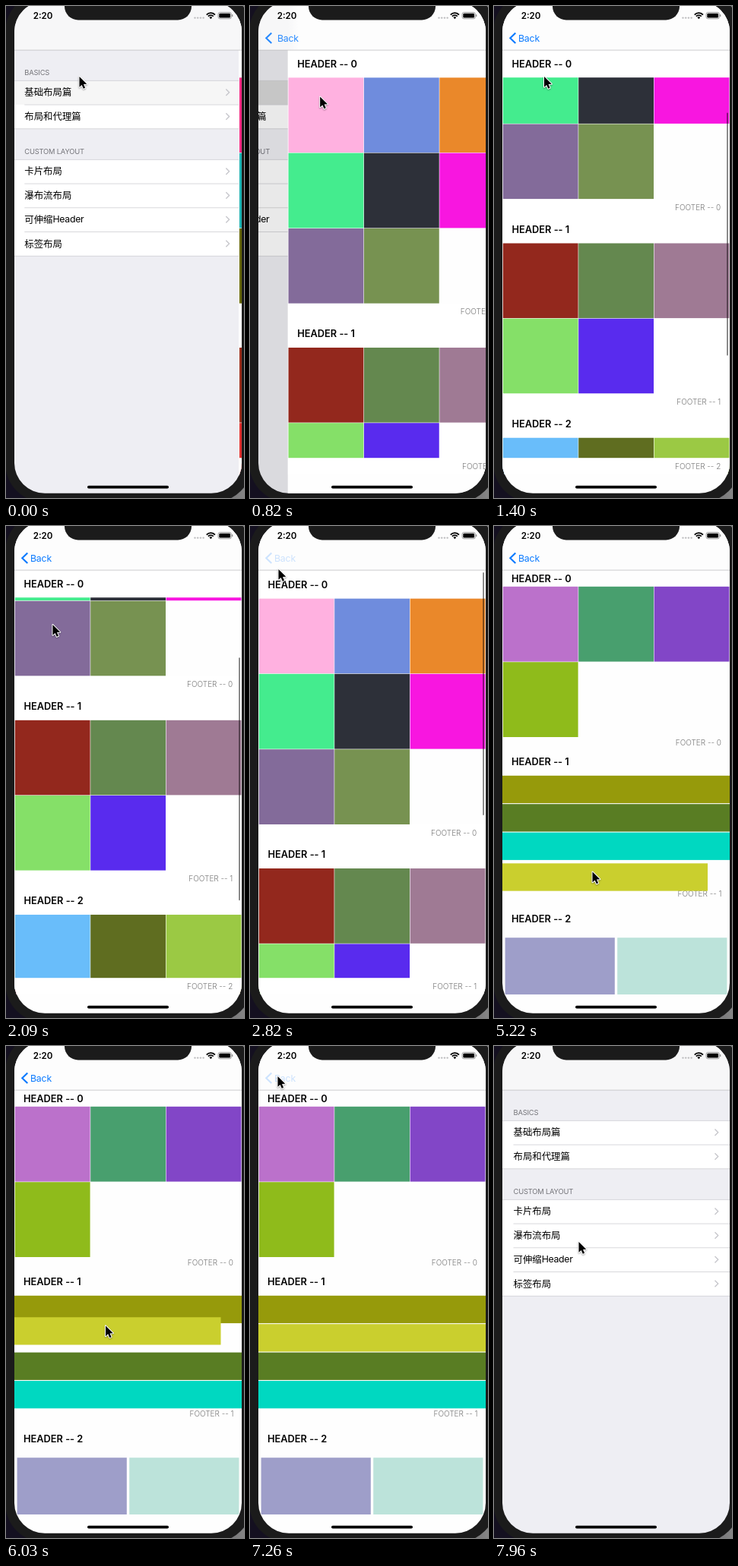
Animation of 313x648 px, one loop 8 s. Source, as an HTML page with a canvas:

```html
<!DOCTYPE html>
<html lang="zh">
<head>
<meta charset="utf-8">
<title>Collection layouts</title>
<style>
html, body { margin: 0; width: 100%; height: 100%; overflow: hidden; background: #1b1b1b; }
canvas { display: block; width: 313px; height: 648px; }
</style>
</head>
<body>
<canvas id="stage"></canvas>
<script>
const W = 313, H = 648, LOOP = 8000;
const LEFT = 11, RIGHT = 310, WIDTH = 299, NAV = 58, SAFE = 617;
const CELL = 98.8, PITCH = 99.4, BAR = 36.3, BAR_PITCH = 37.4;
const LATIN = 'Inter, "Liberation Sans", sans-serif';
const CJK = '"Noto Sans CJK SC", "Noto Sans CJK", sans-serif';

const canvas = document.getElementById('stage');
const ctx = canvas.getContext('2d');
const dpr = window.devicePixelRatio || 1;
canvas.width = W * dpr;
canvas.height = H * dpr;

const clamp = v => Math.max(0, Math.min(1, v));
const lerp = (a, b, k) => a + (b - a) * k;
const smooth = v => { v = clamp(v); return v * v * (3 - 2 * v); };

// Piecewise eased track: rows are [time, ...values].
function track(keys, t) {
  let i = 0;
  while (i < keys.length - 1 && keys[i + 1][0] <= t) i++;
  const a = keys[i], b = keys[Math.min(i + 1, keys.length - 1)];
  const k = a === b ? 0 : smooth((t - a[0]) / (b[0] - a[0]));
  return a.slice(1).map((v, j) => lerp(v, b[j + 1], k));
}

// Remaining share of a navigation transition, 1 to 0.
function remain(ms) {
  if (ms <= 0) return 1;
  const k = ms * 0.016;
  return Math.max(0, ((1 + k) * Math.exp(-k) - 0.003) / 0.997);
}

const pointerKeys = [
  [0, 96.5, 93], [480, 96.5, 93], [600, 95, 104], [720, 95, 104], [1180, 72, 230],
  [1400, 66, 93], [1800, 62, 100], [2050, 62, 120], [2360, 50, 330], [2600, 12, 80],
  [2760, 37.5, 57], [2880, 37.5, 57], [3330, 76, 142], [3600, 76.5, 155], [4590, 76.5, 155],
  [5000, 128, 430], [5220, 129.5, 455.5], [5340, 130, 451], [5950, 131, 369],
  [6090, 131, 368], [6400, 131, 368], [7140, 36.5, 40], [7560, 36.5, 40], [7960, 111.5, 258]
];
const scrollKeys = [
  [1180, 0], [1400, 137.5], [1800, 215], [2050, 205], [2360, -20], [2820, -1.2], [2900, 0]
];

// Each visit: row tapped, page kind, push time, pop time.
const visits = [
  { row: 0, page: 'early', push: -4000, pop: -380 },
  { row: 0, page: 'basic', push: 600, pop: 2880 },
  { row: 1, page: 'move', push: 3450, pop: 7440 }
];

const early = [
  ['#f72b85', '#3c8f5a', '#b0a2d8', '#1fb5b5', '#c46a3a', '#7d5fe0', '#676700', '#d8a0b4'],
  ['#9a2e1c', '#4f8fd0', '#a8c860', '#e03030', '#50b0a0'], []
];
const basic = [
  ['#ffb1e0', '#6f8cdd', '#ea882a', '#44ec8e', '#2d3039', '#f816e0', '#836b9a', '#779251'],
  ['#93281d', '#64884f', '#9f7a94', '#85e068', '#592bee'],
  ['#69bdfa', '#5f6d20', '#9bc944', '#c2557a', '#3fa7a0', '#d9b04c', '#7a4fd0', '#4c9b3e']
];

const tint = {
  Y: '#cacf2e', O: '#bb71cb', G: '#489f6e', P: '#8246c7', L: '#8fbb1b',
  A: '#969a0b', B: '#597d23', C: '#00d8c1'
};
const orders = [
  [0, 'YOGPL', 'ABC'], [4740, 'OGPYL', 'ABC'], [4850, 'OGPL', 'AYBC'], [4920, 'OGPL', 'ABYC'],
  [4980, 'OGPL', 'ABCY'], [5600, 'OGPL', 'ABYC'], [5800, 'OGPL', 'AYBC']
];
const LIFT = 4590, DROP = 6390;

function box(x, y, w, h, color) {
  ctx.fillStyle = color;
  ctx.fillRect(x, y, w, h);
}

function round(x, y, w, h, r, color) {
  ctx.beginPath();
  ctx.roundRect(x, y, w, h, r);
  if (color) { ctx.fillStyle = color; ctx.fill(); }
}

function label(str, x, y, font, color, align = 'left', spacing = 0) {
  ctx.font = font;
  ctx.fillStyle = color;
  ctx.textAlign = align;
  ctx.letterSpacing = spacing + 'px';
  ctx.fillText(str, x, y);
  return ctx.measureText(str).width;
}

function chevron(x, y, dx, dy, width, color) {
  ctx.beginPath();
  ctx.moveTo(x, y - dy);
  ctx.lineTo(x + dx, y);
  ctx.lineTo(x, y + dy);
  ctx.lineWidth = width;
  ctx.strokeStyle = color;
  ctx.stroke();
}

function clipped(x, y, w, h, draw) {
  ctx.save();
  ctx.beginPath();
  ctx.rect(x, y, w, h);
  ctx.clip();
  draw();
  ctx.restore();
}

const title = (n, x, mid) => label('HEADER -- ' + n, x, mid + 4.7, '600 12.8px ' + LATIN, '#000');
const footnote = (n, x, mid) => label('FOOTER -- ' + n, x, mid + 3.6, '300 10px ' + LATIN, '#777', 'right');

function drawGroup(name, top, rows, first, lit, glow) {
  const step = 31.75, bottom = top + step * rows.length;
  label(name, 25.5, top - 7.3, '400 9.4px ' + LATIN, '#76767b', 'left', -0.2);
  box(LEFT, top, WIDTH, bottom - top, '#fff');
  rows.forEach(([cjk, latin], i) => {
    const y = top + i * step;
    if (first + i === lit && glow > 0) box(LEFT, y, WIDTH, step, `rgba(0,0,0,${0.15 * glow})`);
    const w = label(cjk, 25.5, y + 20, '400 12.4px ' + CJK, '#000');
    if (latin) label(latin, 25.5 + w, y + 19.6, '400 12.3px ' + LATIN, '#000', 'left', -0.3);
    chevron(290.5, y + 15.4, 4.2, 4.2, 1.4, '#c7c7cc');
    if (i) box(25.5, y - 0.4, 285, 0.8, '#cfcfd3');
  });
  box(LEFT, top - 0.4, WIDTH, 0.8, '#cfcfd3');
  box(LEFT, bottom - 0.4, WIDTH, 0.8, '#cfcfd3');
}

function drawList(shown, lit, glow) {
  box(LEFT, 0, WIDTH, H, '#eeeef3');
  ctx.save();
  ctx.translate(-0.3 * WIDTH * shown, 0);
  drawGroup('BASICS', 98.3, [['基础布局篇'], ['布局和代理篇']], 0, lit, glow);
  drawGroup('CUSTOM LAYOUT', 202.3,
    [['卡片布局'], ['瀑布流布局'], ['可伸缩', 'Header'], ['标签布局']], 2, lit, glow);
  ctx.restore();
  if (shown > 0) box(LEFT, 0, WIDTH, H, `rgba(0,0,0,${0.1 * shown})`);
}

// Grid sections with pinned headers and footers.
function drawGrid(sections, scroll, bar) {
  const head = 36.2, foot = 21.8;
  let top = NAV - scroll;
  sections.forEach((colors, s) => {
    const start = top + head;
    const end = start + Math.ceil(colors.length / 3) * PITCH - 0.6;
    colors.forEach((c, i) => {
      box(11.8 + (i % 3) * PITCH, start + Math.floor(i / 3) * PITCH, CELL, CELL, c);
    });
    const footY = Math.max(top + head, Math.min(end, SAFE - foot));
    const headY = Math.min(end + foot - head, Math.max(top, NAV));
    if (top < SAFE - foot - head) {
      box(LEFT, footY, WIDTH, SAFE - footY, '#fff');
      footnote(s, 298.3, footY + 11);
    } else {
      box(LEFT, top, WIDTH, end - top + foot, '#fff');
    }
    box(LEFT, headY, WIDTH, head, '#fff');
    title(s, 23.5, headY + 18);
    top = end + foot;
  });
  if (bar > 0) {
    const view = SAFE - NAV, ratio = view / (top + scroll - NAV);
    round(306, 61 + Math.max(0, scroll) * ratio, 2, view * ratio - 3, 1, `rgba(0,0,0,${0.45 * bar})`);
  }
}

function slot(order, id) {
  const i = order[1].indexOf(id), j = order[2].indexOf(id);
  return i >= 0
    ? [11.8 + (i % 3) * PITCH, 79.8 + Math.floor(i / 3) * PITCH, CELL, CELL]
    : [LEFT, 328.8 + j * BAR_PITCH, WIDTH, BAR];
}

// Folds every reorder so far into one smooth value.
function settle(t, read) {
  return orders.slice(1).reduce((now, order) => {
    const k = smooth((t - order[0]) / 200);
    return read(order).map((v, i) => lerp(now[i], v, k));
  }, read(orders[0]));
}

function drawMove(t, pointer) {
  const [count] = settle(t, o => [o[2].length]);
  const end = 328.8 + count * BAR_PITCH;
  title(0, 23, 69);
  footnote(0, 299, 285);
  title(1, 23, 310.5);
  footnote(1, 299.5, end + 6);
  title(2, 23, end + 38.7);
  box(14.6, end + 63.8, 144.2, 112, '#9e9ec9');
  box(162.2, end + 63.8, 144.2, 112, '#bce3da');
  for (const id of 'OGPLABCY') {
    let [x, y, w, h] = settle(t, o => slot(o, id));
    if (id === 'Y') {
      const held = smooth((t - LIFT) / 150) * (1 - smooth((t - DROP) / 200));
      x = lerp(x, pointer[0] + 2 - w / 2, held);
      y = lerp(y, pointer[1] + 7 - h / 2, held);
    }
    box(x, y, w, h, tint[id]);
  }
}

function drawPage(visit, t, pointer) {
  box(LEFT, 0, WIDTH, H, '#fefefe');
  clipped(LEFT, NAV, WIDTH, SAFE - NAV, () => {
    if (visit.page === 'move') return drawMove(t, pointer);
    const live = visit.page === 'basic';
    const bar = live ? smooth((t - 1180) / 80) * (1 - smooth((t - 2840) / 200)) : 0;
    drawGrid(live ? basic : early, live ? track(scrollKeys, t)[0] : 0, bar);
  });
}

function drawNav(t, shown) {
  const edge = LEFT + WIDTH * (1 - shown);
  box(LEFT, 0, WIDTH, NAV, '#f7f7f8');
  if (shown > 0) {
    const fade = ctx.createLinearGradient(edge, 0, edge + 14 * (1 - shown) + 12, 0);
    fade.addColorStop(0, shown < 1 ? '#f7f7f8' : '#fdfdfd');
    fade.addColorStop(1, '#fdfdfd');
    box(edge, 0, RIGHT - edge, NAV, fade);
  }
  box(LEFT, NAV - 0.3, WIDTH, 0.8, '#bfbfc2');
  const press = Math.max(
    smooth((t - 2720) / 60) * (t < 2960 ? 1 : 0),
    smooth((t - 7160) / 60));
  ctx.globalAlpha = clamp(shown * (1 - 0.8 * press));
  if (shown > 0.02) {
    chevron(28.3, 42.3, -7, 6.7, 2.1, '#0a7aff');
    label('Back', 32 + 30 * (1 - shown), 46.8, '400 12.3px ' + LATIN, '#0a7aff', 'left', -0.2);
  }
  ctx.globalAlpha = 1;
}

function drawStatus() {
  label('2:20', 35.7, 16.8, '600 11.6px ' + LATIN, '#000');
  for (let i = 0; i < 4; i++) {
    ctx.beginPath();
    ctx.arc(248.5 + i * 3.7, 15.6, 1.2, 0, 7);
    ctx.fillStyle = '#bdbdbf';
    ctx.fill();
  }
  ctx.strokeStyle = '#000';
  ctx.lineWidth = 1.8;
  for (const r of [7.6, 4.7]) {
    ctx.beginPath();
    ctx.arc(269.3, 16.8, r, -Math.PI * 0.76, -Math.PI * 0.24);
    ctx.stroke();
  }
  ctx.beginPath();
  ctx.moveTo(269.3, 17.2);
  ctx.arc(269.3, 16.8, 2.6, -Math.PI * 0.76, -Math.PI * 0.24);
  ctx.fillStyle = '#000';
  ctx.fill();
  round(279, 8.4, 17.4, 8.4, 2.4);
  ctx.lineWidth = 0.8;
  ctx.strokeStyle = '#8c8c8c';
  ctx.stroke();
  round(280.3, 9.7, 14.8, 5.8, 1.3, '#000');
  round(297.1, 11.1, 1.2, 3, 0.6, '#8c8c8c');
}

function drawPointer([x, y]) {
  const shape = [[0, 0], [0, 13.8], [3.2, 10.9], [5.3, 15.8], [7.6, 14.8], [5.5, 10], [9.8, 9.8]];
  ctx.save();
  ctx.translate(x, y);
  ctx.beginPath();
  shape.forEach(p => ctx.lineTo(...p));
  ctx.closePath();
  ctx.lineJoin = 'round';
  ctx.shadowColor = 'rgba(0,0,0,.35)';
  ctx.shadowBlur = 2 * dpr;
  ctx.shadowOffsetY = dpr;
  ctx.lineWidth = 2;
  ctx.strokeStyle = '#fff';
  ctx.stroke();
  ctx.shadowColor = 'transparent';
  ctx.fillStyle = '#000';
  ctx.fill();
  ctx.restore();
}

function draw(t) {
  const visit = visits.filter(v => t >= v.push - 80).pop();
  const shown = t < visit.pop ? 1 - remain(t - visit.push) : remain(t - visit.pop);
  const glow = t < visit.pop ? 1 : clamp(1 - (t - visit.pop) / 500);
  const pointer = track(pointerKeys, t);

  ctx.setTransform(dpr, 0, 0, dpr, 0, 0);
  const back = ctx.createLinearGradient(0, 0, W, 0);
  back.addColorStop(0, '#141020');
  back.addColorStop(0.6, '#141020');
  back.addColorStop(1, '#858585');
  box(0, 0, W, H, back);
  round(-1, -18, 325, 672, 52, '#1b1b1b');

  ctx.save();
  round(LEFT, -6, WIDTH, 647.8, 40);
  ctx.clip();
  if (shown < 1) drawList(shown, visit.row, glow);
  if (shown > 0) {
    const offset = WIDTH * (1 - shown);
    ctx.save();
    ctx.translate(offset, 0);
    drawPage(visit, t, [pointer[0] - offset, pointer[1]]);
    ctx.restore();
  }
  drawNav(t, shown);
  drawStatus();
  round(107, 631.8, 107, 3.7, 1.8, '#000');
  ctx.restore();

  round(77, -20, 167, 38.4, 18, '#1b1b1b');
  drawPointer(pointer);
}

function frame() {
  draw(performance.now() % LOOP);
  requestAnimationFrame(frame);
}
frame();
</script>
</body>
</html>
```
